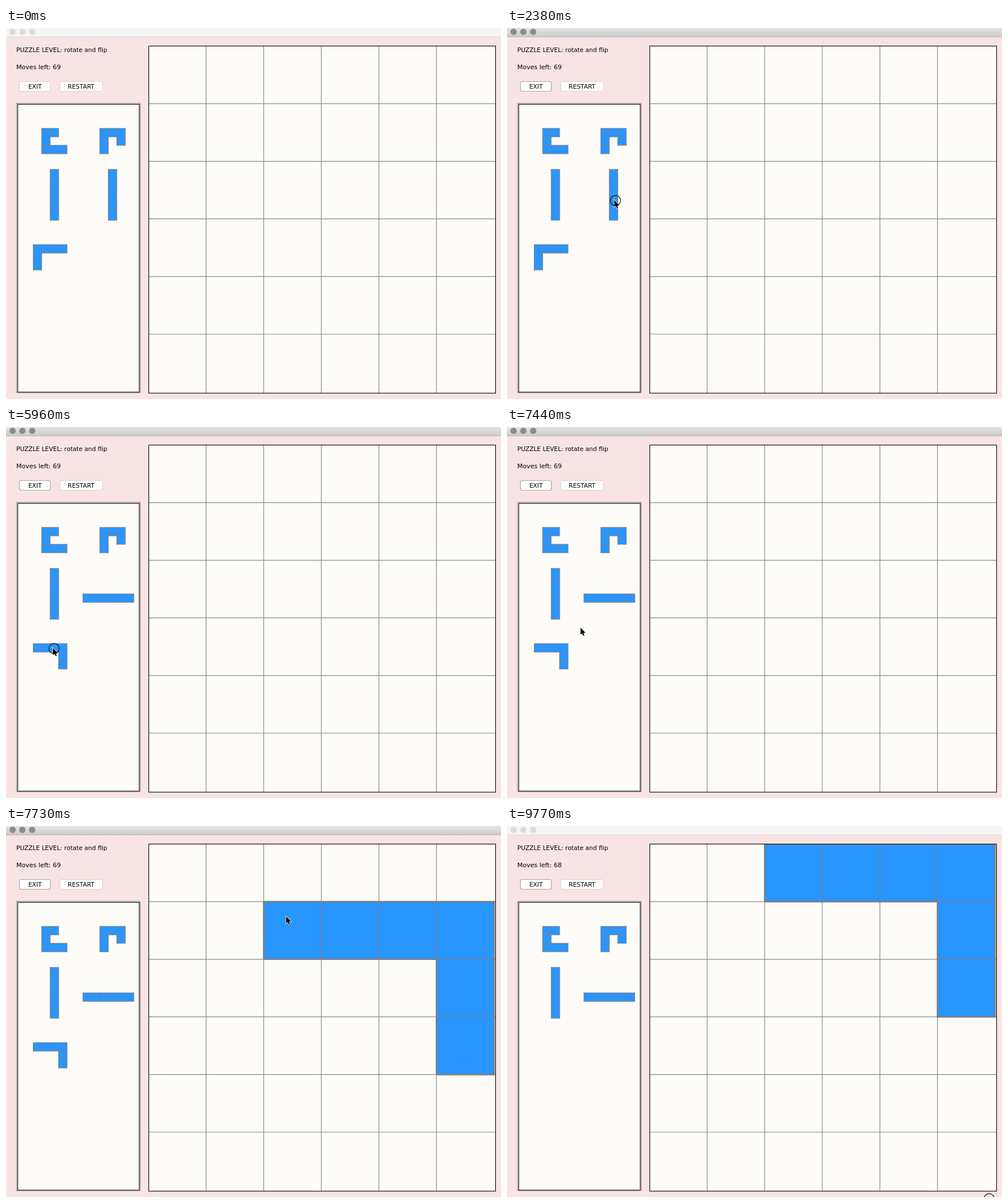
Animation, 865 px wide and 648 px high, one loop 9.87 s. Source, as an HTML page:

```html
<!DOCTYPE html>
<html lang="en">
<head>
<meta charset="utf-8">
<title>Puzzle level</title>
<style>
  html, body { margin: 0; width: 100%; height: 100%; overflow: hidden; background: #f8e4e4; }
  svg { display: block; width: 865px; height: 648px; }
  text { font: 10.6px "DejaVu Sans", sans-serif; fill: #000; }
  .moves { font-size: 11px; }
  .paper { fill: #fdfcf8; }
  .line { fill: none; stroke: #000; stroke-width: 1.1; }
  .grid { fill: none; stroke: #8a8a8a; stroke-width: 1.2; }
  .cell { fill: #2995ff; stroke: #808080; }
  .edge { fill: none; stroke: #808080; stroke-linecap: square; }
  .button { fill: #fff; stroke: #d6d0d0; }
  .button.focus { stroke: #aaa6a6; stroke-width: 1.2; }
  .dots { fill: #dcdcdc; }
  .bar { fill: #f5f5f5; }
  .rule { fill: #e2dada; }
  .active .bar { fill: url(#metal); }
  .active .dots { fill: #8b8b8b; }
  .active .rule { fill: #b9b5b5; }
  .arrow { stroke: #fff; stroke-width: 1.6; paint-order: stroke; }
</style>
</head>
<body>
<svg viewBox="0 0 865 648">
  <defs>
    <linearGradient id="metal" x1="0" y1="0" x2="0" y2="1">
      <stop offset="0" stop-color="#e4e4e4"/>
      <stop offset="1" stop-color="#cbcbcb"/>
    </linearGradient>
    <clipPath id="boardClip"><rect x="249" y="32" width="606" height="606"/></clipPath>
  </defs>

  <rect width="865" height="648" fill="#f8e4e4"/>
  <g id="titlebar">
    <rect class="bar" width="865" height="15.5"/>
    <rect class="rule" y="15" width="865" height="1"/>
    <g class="dots">
      <circle cx="11.5" cy="6.7" r="5.5"/>
      <circle cx="28.6" cy="6.7" r="5.5"/>
      <circle cx="45.8" cy="6.7" r="5.5"/>
    </g>
  </g>

  <text x="18" y="42">PUZZLE LEVEL: rotate and flip</text>
  <text id="moves" class="moves" x="18" y="72"></text>
  <rect id="exit" class="button" x="23.5" y="93.5" width="54" height="17" rx="3"/>
  <rect class="button" x="94" y="93.5" width="74.5" height="17" rx="3"/>
  <text x="50.7" y="105.7" text-anchor="middle">EXIT</text>
  <text x="131.2" y="105.7" text-anchor="middle">RESTART</text>

  <rect class="paper" x="18.5" y="131.5" width="216" height="505.5" stroke="#777" stroke-width=".9"/>
  <rect class="line" x="20.5" y="133.4" width="212.4" height="502.6"/>
  <g id="tray"></g>

  <rect class="paper" x="249.5" y="31.5" width="606" height="606.3"/>
  <path id="grid" class="grid"/>
  <g id="preview" clip-path="url(#boardClip)"></g>
  <rect class="line" x="249.5" y="31.5" width="606" height="606.3"/>

  <g id="cursor">
    <g transform="scale(.9)">
      <path d="M1 2V15.5L4 12.8 6.2 17.5 8.4 16.5 6.4 12H10.6Z" opacity=".18"/>
      <path class="arrow" d="M0 0V13.5L3 10.8 5.2 15.6 7.5 14.6 5.4 10H9.6Z"/>
    </g>
    <circle id="ring" cx="2" cy="1" r="8.9" fill="none" stroke="#000" stroke-width="1.1"/>
  </g>
</svg>
<script>
const LOOP = 9870, STEP = 145;
const CELL = 100.65, LEFT = 249, TOP = 31.5, UNIT = 14.8;
const $ = id => document.getElementById(id);

// Shapes are rows of cells, "#" filled.
const shapes = {
  hook: ["##.", "#..", "###"],
  crook: ["###", "#.#", "#.."],
  tall: Array(6).fill("#"),
  wide: ["######"],
  left: ["####", "#...", "#..."],
  right: ["####", "...#", "...#"]
};

function piece(name, x, y, size = UNIT, thin = .45, thick = .9) {
  const rows = shapes[name];
  const filled = (c, r) => (rows[r] || "")[c] === "#";
  let cells = "", edges = "";
  rows.forEach((row, r) => [...row].forEach((ch, c) => {
    if (ch !== "#") return;
    const l = x + c * size, t = y + r * size;
    cells += `M${l} ${t}h${size}v${size}h${-size}Z`;
    if (!filled(c, r - 1)) edges += `M${l} ${t}h${size}`;
    if (!filled(c, r + 1)) edges += `M${l} ${t + size}h${size}`;
    if (!filled(c - 1, r)) edges += `M${l} ${t}v${size}`;
    if (!filled(c + 1, r)) edges += `M${l + size} ${t}v${size}`;
  }));
  return `<path class="cell" stroke-width="${thin}" d="${cells}"/>` +
    `<path class="edge" stroke-width="${thick}" d="${edges}"/>`;
}

let lines = "";
for (let i = 1; i < 6; i++)
  lines += `M${LEFT + i * CELL} 32V638M250 ${TOP + i * CELL}H855`;
$("grid").setAttribute("d", lines);

// Pointer moves: when, in how many steps, where to.
const moves = [
  { start: 290, steps: 4, x: 187.5, y: 300.5 },
  { start: 3425, steps: 1, x: 143.5, y: 325 },
  { start: 3570, steps: 3, x: 82, y: 386 },
  { start: 6110, steps: 5, x: 93, y: 320 },
  { start: 7145, steps: 2, x: 128.5, y: 350.5 },
  { start: 7440, steps: 2, x: 489.5, y: 158 },
  { start: 7730, steps: 3, x: 511, y: 97.5 },
  { start: 9625, steps: 1, x: 840.5, y: 650 }
];
const turns = [1780, 2380, 2970], flips = [4620, 5210, 5960];
const activate = 1180, pick = 7440, drop = 8460, leave = 9770;

const smooth = f => f * f * (3 - 2 * f);
const odd = (times, t) => times.filter(k => k <= t).length % 2 === 1;
const held = (times, t, hold) => times.some(k => t >= k && t < k + hold);

function pointer(t) {
  let x = 40, y = 503;
  for (const m of moves) {
    if (t < m.start) break;
    const done = Math.floor((t - m.start) / STEP);
    const f = smooth(Math.min(1, done / m.steps));
    x += (m.x - x) * f;
    y += (m.y - y) * f;
  }
  return { x, y };
}

function preview(t) {
  const { x, y } = pointer(Math.min(t, drop));
  if (t < pick || x < LEFT) return "";
  const col = Math.min(2, Math.floor((x - LEFT) / CELL));
  const row = Math.floor((y - TOP) / CELL);
  return piece("right", LEFT + col * CELL, TOP + row * CELL, CELL, .9, 2.6);
}

function tray(t) {
  const placed = t >= drop + 2 * STEP;
  return piece("hook", 62.3, 175.3) +
    piece("crook", 164, 175.3) +
    piece("tall", 77.2, 247) +
    (odd(turns, t) ? piece("wide", 134.4, 291.4) : piece("tall", 178.8, 247)) +
    (placed ? "" : piece(odd(flips, t) ? "right" : "left", 47.5, 378.3));
}

const shown = {};
function fill(id, html) {
  if (shown[id] !== html) $(id).innerHTML = shown[id] = html;
}

function draw(t) {
  const { x, y } = pointer(t);
  const ring = held([activate, ...turns, leave], t, 2 * STEP) || held([...flips, drop], t, STEP);
  $("cursor").setAttribute("transform", `translate(${x} ${y})`);
  $("cursor").style.display = t < 290 ? "none" : "";
  $("ring").style.display = ring ? "" : "none";
  $("titlebar").classList.toggle("active", t >= activate + STEP && t < leave);
  $("exit").classList.toggle("focus", t >= activate + 2 * STEP);
  fill("moves", "Moves left: " + (t < 9200 ? 69 : 68));
  fill("tray", tray(t));
  fill("preview", preview(t));
}

const start = performance.now();
function tick() {
  draw((performance.now() - start) % LOOP);
  requestAnimationFrame(tick);
}
tick();
</script>
</body>
</html>
```
